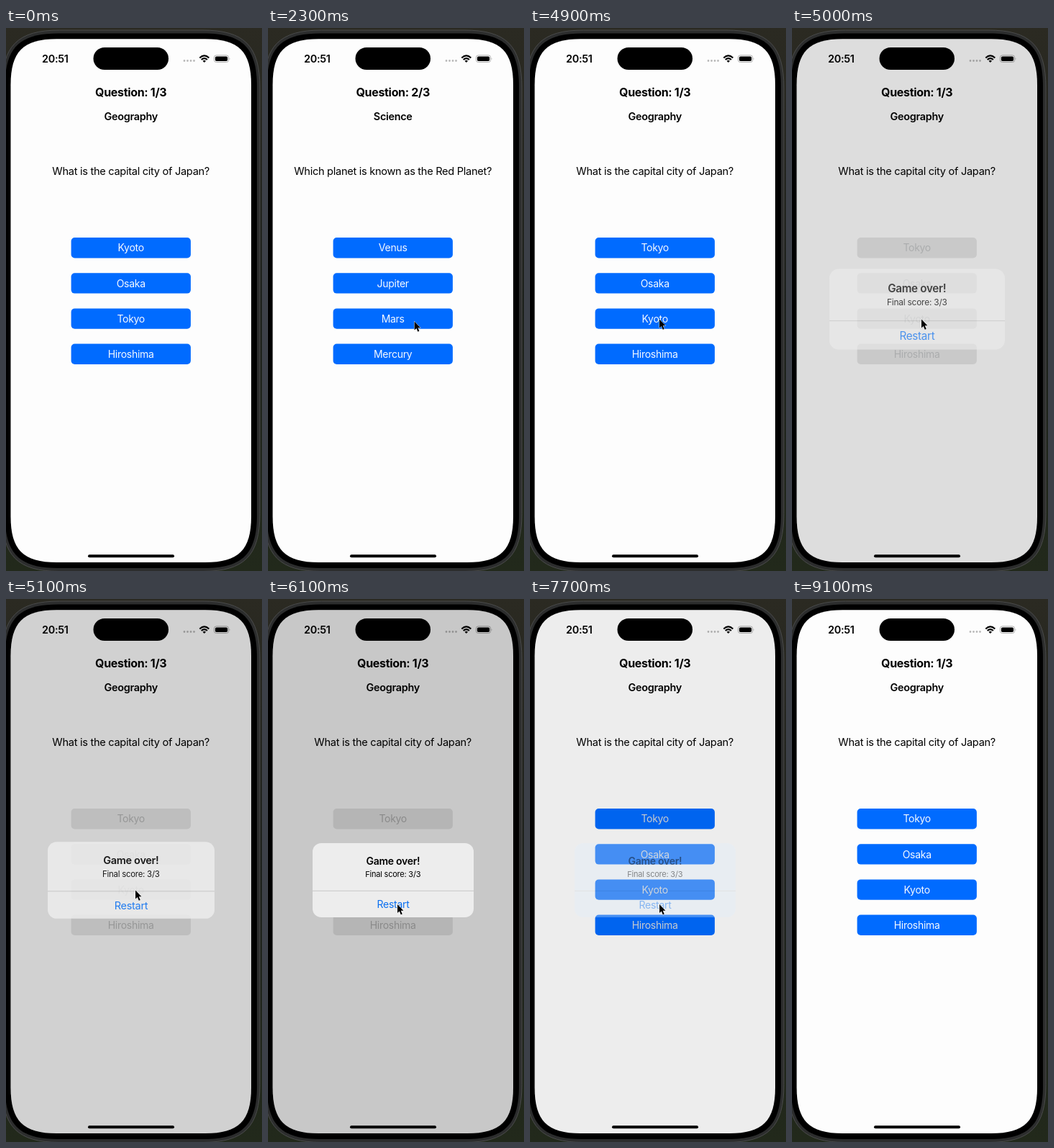
An HTML page for the animation above (9.8 s loop, 356 px wide and 754 px high).

```html
<!DOCTYPE html>
<html lang="en">
<head>
<meta charset="utf-8">
<title>Quiz</title>
<style>
  html, body { margin: 0; width: 100%; height: 100%; overflow: hidden; background: #1b1e18; }
  svg { display: block; width: 100%; height: 100%; }
  text {
    font: 400 14.6px Inter, "Liberation Sans", sans-serif;
    letter-spacing: -.02em;
    text-anchor: middle;
  }
  #title { font-size: 16px; font-weight: 700; }
  #topic, #clock { font-size: 14.4px; font-weight: 600; }
  #answers text, #alert text { font-size: 14px; }
  #alert .head { font-weight: 600; }
  #alert .note { font-size: 11px; }
</style>
</head>
<body>
<svg viewBox="0 0 356 754">
  <defs>
    <linearGradient id="photo" x2="0" y2="1">
      <stop offset="0" stop-color="#2b2a22"/>
      <stop offset=".5" stop-color="#1d211d"/>
      <stop offset="1" stop-color="#22291b"/>
    </linearGradient>
    <clipPath id="glass"><path id="screen"/></clipPath>
  </defs>

  <rect width="356" height="754" fill="url(#photo)"/>
  <path id="rim" fill="#2c2d2d" stroke="#4a4b4b"/>
  <path id="bezel"/>

  <g clip-path="url(#glass)">
    <rect x="6" y="15" width="336" height="728" fill="#fdfdfd"/>
    <text id="title" x="173.7" y="94.5"/>
    <text id="topic" x="173.7" y="128"/>
    <text id="ask" x="173.7" y="204"/>
    <g id="answers"></g>

    <text id="clock" x="68.3" y="48">20:51</text>
    <path d="M248 45.5H262" stroke="#b9b9b9" stroke-width="2.8" stroke-linecap="round" stroke-dasharray="0 4.5"/>
    <g fill="none" stroke="#000" stroke-width="2.1">
      <path d="M269.3 41.4Q275.8 35.3 282.3 41.4"/>
      <path d="M271.7 44Q275.8 40.1 279.9 44"/>
    </g>
    <path d="M273.6 45.7Q275.8 43.8 278 45.7L275.8 48Z"/>
    <rect x="289.4" y="37.9" width="20.2" height="9.6" rx="3" fill="none" stroke="#a6a6a6" stroke-width=".9"/>
    <rect x="290.9" y="39.4" width="17.2" height="6.6" rx="1.8"/>
    <path d="M310.7 41.2Q312.3 42.7 310.7 44.2Z" fill="#a6a6a6"/>

    <rect id="dim" x="6" y="15" width="336" height="728"/>

    <g id="alert">
      <g class="panel">
        <rect x="62" y="339" width="224" height="103" rx="12"/>
        <path d="M62 405.3H286" stroke="#c3c3c3" stroke-width=".9"/>
      </g>
      <g class="copy">
        <text class="head" x="173.8" y="369">Game over!</text>
        <text class="note" x="173.8" y="385.8">Final score: 3/3</text>
        <text x="174" y="429.5" fill="#0a6ff0">Restart</text>
      </g>
    </g>
  </g>

  <rect x="121.5" y="27" width="104.5" height="31" rx="15.5"/>
  <rect x="114" y="731.3" width="120" height="4" rx="2"/>
  <path id="cursor" d="M0 0V13.6L3.1 10.8L5.4 16.2L7.7 15.2L5.4 10H9.6Z" stroke="#fff" stroke-linejoin="round" paint-order="stroke"/>
</svg>

<script>
const LOOP = 9800, STEP = 100;
const $ = q => document.querySelector(q);
const clamp = v => Math.min(1, Math.max(0, v));
const smooth = k => k * k * (3 - 2 * k);
const lerp = (a, b, k) => a + (b - a) * k;
const mix = (a, b, k) => `rgb(${a.map((v, i) => Math.round(lerp(v, b[i], k)))})`;

// Box with continuous corners that reach e along each side
function slab(l, t, r, b, e) {
  const k = e * .27;
  return `M${l} ${t + e}C${l} ${t + k} ${l + k} ${t} ${l + e} ${t}
    H${r - e}C${r - k} ${t} ${r} ${t + k} ${r} ${t + e}
    V${b - e}C${r} ${b - k} ${r - k} ${b} ${r - e} ${b}
    H${l + e}C${l + k} ${b} ${l} ${b - k} ${l} ${b - e}Z`;
}
$("#screen").setAttribute("d", slab(6.5, 15.3, 341, 742, 64));
$("#bezel").setAttribute("d", slab(-1.5, 7.5, 349, 750, 74));
$("#rim").setAttribute("d", slab(-5.5, 3, 353, 754.5, 80));

const capital = ["Geography", "What is the capital city of Japan?"];
const pages = [
  { from: 0, no: 1, lines: capital, answers: ["Kyoto", "Osaka", "Tokyo", "Hiroshima"] },
  { from: 1400, no: 2, lines: ["Science", "Which planet is known as the Red Planet?"],
    answers: ["Venus", "Jupiter", "Mars", "Mercury"] },
  { from: 2800, no: 3, lines: ["History", "In which year did World War II end?"],
    answers: ["1943", "1944", "1945", "1946"] },
  { from: 4800, no: 1, lines: capital, answers: ["Tokyo", "Osaka", "Kyoto", "Hiroshima"] }
];

// Pointer moves: start, end, target
const entry = [117, 341];
const moves = [
  [400, 700, [215, 379]],
  [800, 1100, [208, 408]],
  [2200, 2600, [180, 404.5]],
  [5600, 5800, [180, 424]],
  [8200, 8400, [242, 326]]
];
const pointerAt = t => moves.reduce((p, [a, b, to]) => {
  const k = smooth(clamp((t - a) / (b - a)));
  return p.map((v, i) => lerp(v, to[i], k));
}, entry);

// Alert presence: springs in after 4900, eases out from 7400 to 8000
function presence(t) {
  if (t <= 4900) return 0;
  if (t <= 7400) return 1 - .4 ** ((t - 4900) / STEP);
  return (1 - clamp((t - 7400) / 600)) ** 1.7;
}

$("#answers").innerHTML = [0, 1, 2, 3].map(i => {
  const y = 291 + i * 49.2;
  return `<rect x="90.6" y="${y}" width="166.3" height="28.4" rx="5"/>
    <text x="173.7" y="${y + 19.3}"></text>`;
}).join("");
const labels = [...document.querySelectorAll("#answers text")];

function drawPage(t) {
  const page = pages.findLast(p => p.from <= t);
  $("#title").textContent = `Question: ${page.no}/3`;
  [$("#topic").textContent, $("#ask").textContent] = page.lines;
  labels.forEach((el, i) => el.textContent = page.answers[i]);
}

function drawAlert(t) {
  const show = presence(t), soft = show ** .7;
  const grey = clamp(show * 4 - 1.3);
  const scale = t < 7400 ? 1 + .222 * (1 - show) : 1;
  $("#dim").style.opacity = .21 * show;
  $(".panel").style.opacity = show;
  $(".panel rect").setAttribute("fill", mix([224, 239, 255], [237, 237, 237], grey));
  $(".copy").style.opacity = soft;
  $("#alert").setAttribute("transform",
    `translate(174 390.5) scale(${scale}) translate(-174 -390.5)`);
  $("#answers").setAttribute("fill", mix([0, 107, 255], [230, 230, 230], grey));
  labels.forEach(el => el.setAttribute("fill", mix([245, 249, 255], [174, 174, 174], soft)));
}

function drawPointer(t) {
  const [x, y] = pointerAt(t);
  $("#cursor").style.display = t >= 400 && t < 8500 ? "" : "none";
  $("#cursor").setAttribute("transform", `translate(${x} ${y}) scale(.88)`);
}

const start = performance.now();
let last = -1;
function tick() {
  const t = Math.floor((performance.now() - start) % LOOP / STEP) * STEP;
  if (t !== last) {
    last = t;
    drawPage(t);
    drawAlert(t);
    drawPointer(t);
  }
  requestAnimationFrame(tick);
}
tick();
</script>
</body>
</html>
```
